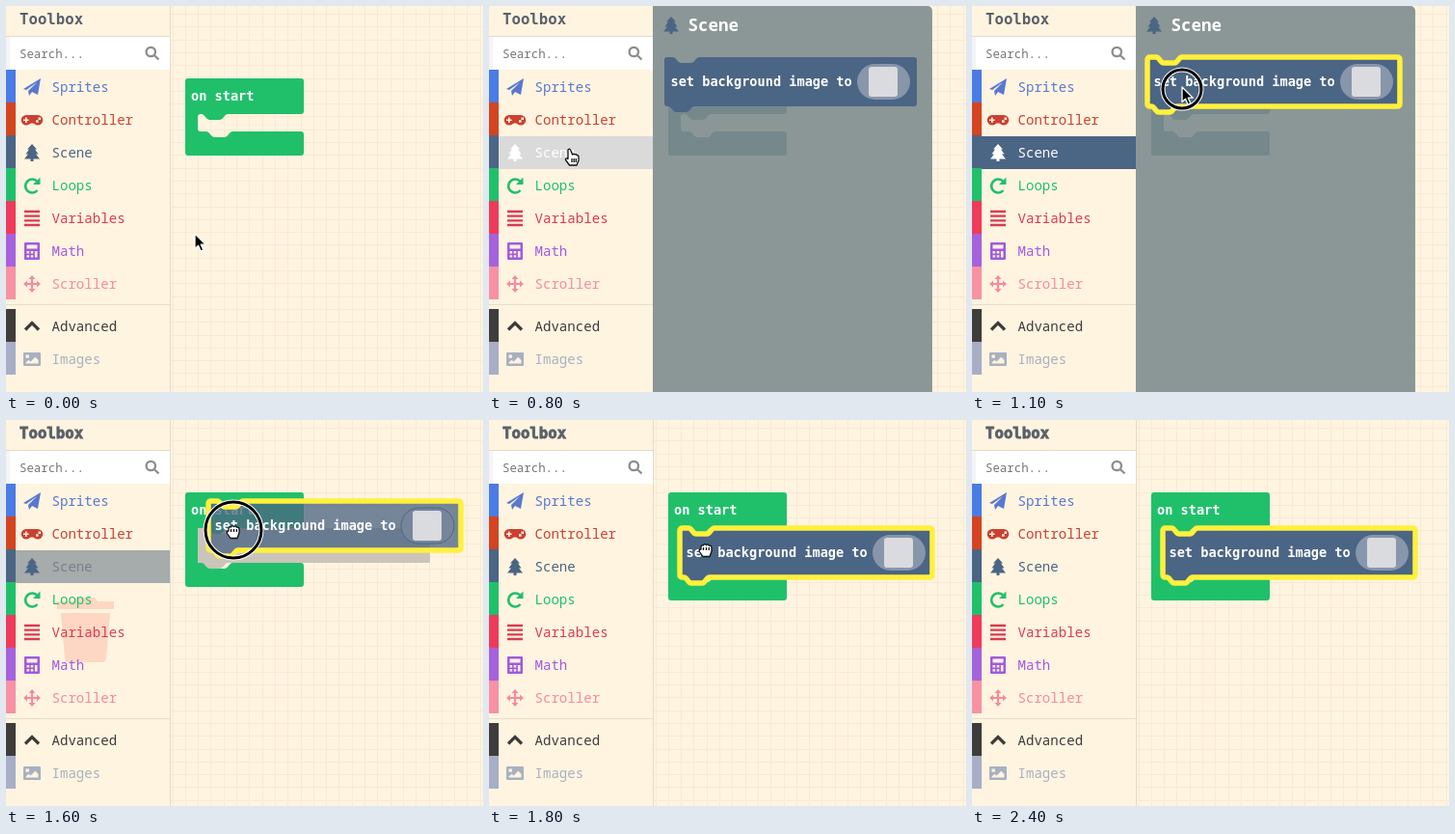
These frames come from a looping animation (495 px wide and 400 px high, 4.4 s). An HTML page with a canvas:

```html
<!DOCTYPE html>
<html lang="en">
<head>
<meta charset="utf-8">
<title>Block editor</title>
<style>
html, body { margin: 0; width: 100%; height: 100%; overflow: hidden; background: #fff4e0; }
canvas { display: block; }
</style>
</head>
<body>
<canvas id="stage" width="495" height="400"></canvas>
<script>
const ctx = document.getElementById('stage').getContext('2d');
const LOOP = 4400, TICK = 100;
const CREAM = '#fff4e0', SLATE = '#4b6584', GREEN = '#20c06b', YELLOW = '#fff03c';
const LIGHT_FONT = '"Noto Sans Mono", monospace';
const BLOCK_FONT = '"DejaVu Sans Mono", monospace';

// Each icon is [filled path, stroked path, line width], centred on 0,0.
const ICONS = {
  plane: ['M-9 2 9-9 6 8 0 5-3 9-4 4 5-5-6 3Z'],
  pad: ['M-6-5H6A5.3 5.3 0 0 1 6 5.6C3 5.6 3 3.5 0 3.5S-3 5.6-6 5.6A5.3 5.3 0 0 1-6-5Z' +
    'M-9-.6V1H-7V3H-5.4V1H-3.4V-.6H-5.4V-2.6H-7V-.6Z' +
    'M4 .2h2.6v2.6h-2.6ZM6.5-2.6h2.6v2.6h-2.6Z'],
  tree: ['M0-9 5-3.5H3L6.5 1.5H4L8 6.5H1.5V9H-1.5V6.5H-8L-4 1.5H-6.5L-3-3.5H-5Z'],
  redo: ['M8.5-8.5V-1H1Z', 'M5.5-4A7 7 0 1 0 5.5 5', 2.7],
  lines: ['', 'M-8-7H8M-8-2.3H8M-8 2.4H8M-8 7H8', 2.3],
  calc: ['M-7-9H7Q8-9 8-8V8Q8 9 7 9H-7Q-8 9-8 8V-8Q-8-9-7-9ZM-5.5-6.5V-2.5H5.5V-6.5Z' +
    'M-5.5 0v2.4h2.6V0ZM-1.3 0v2.4h2.6V0ZM2.9 0v6.6h2.6V0ZM-5.5 4.2v2.4h2.6V4.2ZM-1.3 4.2v2.4h2.6V4.2Z'],
  move: ['M0-9 3.6-5H-3.6ZM0 9 3.6 5H-3.6ZM-9 0-5-3.6V3.6ZM9 0 5-3.6V3.6Z', 'M-6 0H6M0-6V6', 2.2],
  up: ['', 'M-7 3.5 0-3.5 7 3.5', 3.2],
  image: ['M-8-7H8Q9-7 9-6V6Q9 7 8 7H-8Q-9 7-9 6V-6Q-9-7-8-7Z' +
    'M-6.5 4.5H6.5V1L3.3-2.2-1.5 2.5-3.5.8-6.5 3.4ZM-6.5-4.6h3.4v3.4h-3.4Z'],
};

const ROWS = [
  ['Sprites', 'plane', '#4b7be5', '#5978cf'],
  ['Controller', 'pad', '#d54420', '#cb4032'],
  ['Scene', 'tree', SLATE, SLATE],
  ['Loops', 'redo', GREEN, GREEN],
  ['Variables', 'lines', '#ee3b5b', '#d93c50'],
  ['Math', 'calc', '#a662dc', '#a05ae0'],
  ['Scroller', 'move', '#f791a3', '#f58b9f'],
  ['Advanced', 'up', '#3f3d3b', '#3c3c3c'],
  ['Images', 'image', '#a7aec6', '#a9b0bf'],
].map(([label, icon, strip, ink], i) => ({ label, icon, strip, ink, top: 67 + 34 * i + (i > 6 ? 10 : 0) - 1 }));
const SCENE = 2;

const CURSOR_KEYS = [[0, 196, 236], [300, 85, 149], [800, 85, 149], [1100, 218, 84], [1500, 218, 84],
  [1600, 236, 115], [1800, 225, 134], [2200, 225, 134], [2300, 205, 190]];
const BLOCK_KEYS = [[1500, 182, 53], [1600, 210, 84], [1800, 198, 112]];

function along(keys, t) {
  if (t <= keys[0][0]) return keys[0].slice(1);
  const i = keys.findIndex(k => k[0] >= t);
  if (i < 0) return keys[keys.length - 1].slice(1);
  const [t0, x0, y0] = keys[i - 1], [t1, x1, y1] = keys[i];
  const u = (t - t0) / (t1 - t0);
  return [x0 + (x1 - x0) * u, y0 + (y1 - y0) * u];
}

function rect(x, y, w, h, color, radius = 0) {
  ctx.fillStyle = color;
  ctx.beginPath();
  ctx.roundRect(x, y, w, h, radius);
  ctx.fill();
}

function text(str, x, y, font, color) {
  ctx.font = font;
  ctx.fillStyle = color;
  ctx.fillText(str, x, y);
}

function at(x, y, draw) {
  ctx.save();
  ctx.translate(x, y);
  draw();
  ctx.restore();
}

function shape(d, fill, stroke, width) {
  const path = new Path2D(d);
  if (fill) { ctx.fillStyle = fill; ctx.fill(path, 'evenodd'); }
  if (stroke) { ctx.strokeStyle = stroke; ctx.lineWidth = width; ctx.stroke(path); }
}

function icon(name, x, y, color) {
  const [solid, line, width] = ICONS[name];
  at(x, y, () => {
    shape(solid, color);
    if (line) shape(line, null, color, width);
  });
}

// Connector bump, starting 8px right of a block's left edge.
const BUMP = 'h5q2 0 4 3t4 3h11q2 0 4-3t4-3';
const BUMP_BACK = 'h-5q-2 0-4 3t-4 3h-11q-2 0-4-3t-4-3';

function startBlock(innerBottom, color) {
  shape(`M189 75H306q3 0 3 3V109q0 3-3 3H239h-4${BUMP_BACK}H202q-3 0-3 3V${innerBottom - 3}q0 3 3 3
    H203${BUMP}H306q3 0 3 3V${innerBottom + 22}q0 3-3 3H189q-3 0-3-3V78q0-3 3-3Z`, color);
}

function sceneBlock(x, y, glowing, dragged) {
  at(x, y, () => {
    const outline = `M3 0H4${BUMP}H259q3 0 3 3V48q0 3-3 3H36${BUMP_BACK}H3q-3 0-3-3V3q0-3 3-3Z`;
    ctx.globalAlpha = dragged ? .76 : 1;
    shape(outline, SLATE);
    ctx.globalAlpha = 1;
    if (glowing) shape(outline, null, YELLOW, 5.5);
    text('set background image to', 6.5, 30, `bold 13.6px ${BLOCK_FONT}`, '#fff');
    rect(200, 7, 55, 37, dragged ? '#75869b' : '#8896ab', 18.5);
    if (dragged) {
      ctx.strokeStyle = SLATE;
      ctx.lineWidth = 1;
      ctx.stroke();
    }
    rect(212, 10, 30, 31, '#d9dbde', 3);
  });
}

function trash(alpha) {
  ctx.globalAlpha = alpha;
  shape('M53 188H70L73 184H92L95 188H112V196H53ZM57 200H108L104 247Q104 251 100 251H65Q61 251 61 247Z', '#f8a28e');
  ctx.globalAlpha = 1;
}

function workspace() {
  rect(0, 0, 495, 400, CREAM);
  for (let x = 172.5; x < 495; x += 13.3) rect(Math.round(x), 0, 1, 400, '#f8ead5');
  for (let y = 8; y < 400; y += 13.3) rect(171, Math.round(y), 324, 1, '#f8ead5');
}

function toolbox(t, hover, selected) {
  rect(0, 0, 170, 400, CREAM);
  rect(170, 0, 1, 400, '#e3dacb');
  const title = `bold 15.7px ${BLOCK_FONT}`;
  text('Toolbox', 14, 19, title, '#5a6069');
  if (t >= 1600) {
    ctx.strokeStyle = '#5a6069';
    ctx.lineWidth = .8;
    ctx.strokeText('Toolbox', 14, 19);
  }
  rect(0, 31, 170, 1, '#e1dacd');
  rect(0, 32, 170, 34, '#fff');
  rect(0, 32, 4, 34, '#f4f4f6');
  text('Search...', 14, 54, `12.4px ${LIGHT_FONT}`, '#777');
  shape('M155 47.5a4.7 4.7 0 1 0-9.4 0a4.7 4.7 0 1 0 9.4 0M153.7 51 158.5 55.5', null, '#8d8d8d', 2.3);
  rect(0, 309, 170, 1, '#e7decf');

  const fading = t === 1600;
  if (fading || t === 1700) trash(fading ? .35 : .2);
  ROWS.forEach((row, i) => {
    const isScene = i === SCENE;
    const active = isScene && selected;
    let ink = active ? '#fff' : row.ink;
    if (active) rect(0, row.top + 1, 170, 34, hover === i ? '#dadada' : SLATE);
    else if (isScene && fading) rect(0, row.top + 1, 170, 34, '#a6abab');
    else if (hover === i) rect(10, row.top + 1, 160, 34, '#e7e5e3');
    rect(0, row.top, 10, 34, row.strip);
    icon(row.icon, 27, row.top + 18, ink);
    if (isScene && fading) ink = '#74808d';
    text(row.label, 47.5, row.top + 23, `500 14.1px ${LIGHT_FONT}`, ink);
  });
}

function flyout() {
  rect(170, 0, 290, 400, '#8b9796', [0, 5, 0, 0]);
  startBlock(130, '#75898c');
  icon('tree', 189, 20, SLATE);
  text('Scene', 206.5, 26, `bold 17.5px ${LIGHT_FONT}`, '#fff');
}

function ring(x, y, r) {
  for (const [color, width] of [['#fff', 5], ['#000', 3]]) {
    ctx.strokeStyle = color;
    ctx.lineWidth = width;
    ctx.beginPath();
    ctx.arc(x, y, r, 0, 7);
    ctx.stroke();
  }
}

const ARROW = 'M0 0V15.5L3.6 12.2 6 18 8.8 16.8 6.3 11.2H11.3Z';
const POINTER = 'M-3 0Q-1-2 0 1L1.5 5Q3 3.5 4 5Q5.5 4 6.2 5.8Q8 5.3 8 7.5V11L6 16H-1.5L-5.5 10.5Q-6 8-3 9.5Z';
const FIST = 'M-5-2Q-5-5-2.5-4Q-1.5-6.5.5-4.5Q2-6 3.3-3.8Q6-4.5 6 -1.5V2L4 7.5H-3L-6.5 2.5Q-7.5 0-5 0Z';

function cursor(t, x, y) {
  const dragging = t >= 1600 && t < 2300;
  at(x, y, () => {
    ctx.lineJoin = 'round';
    if (dragging) shape(FIST + 'M-2.5-2V1M.5-2V1M3.3-2V1', '#fff', '#111', 1.3);
    else if (x < 170) shape(POINTER + 'M1 9V13M3.2 9V13M5.3 9V13', '#fff', '#111', 1.3);
    else shape(ARROW, '#000', '#fff', 1.3);
  });
}

function render(t) {
  const [x, y] = along(CURSOR_KEYS, t);
  const open = t >= 800 && t < 1600;
  const hover = t < 1100 && x < 170 ? Math.floor((y - 67) / 34) : -1;
  const dragged = t === 1600 || t === 1700;

  workspace();
  toolbox(t, hover, open);
  if (open) {
    flyout();
  } else {
    startBlock(t < 1600 ? 130 : dragged ? 148 : 162, GREEN);
    text('on start', 192, 98, `bold 13.6px ${BLOCK_FONT}`, '#fff');
    if (dragged) shape(`M199 112H203${BUMP}H440V148H235${BUMP_BACK}H199Z`, '#cbc4ba');
  }
  if (t >= 800) sceneBlock(...along(BLOCK_KEYS, t), t >= 1100, dragged);

  if (t >= 300 && t < 800) ring(83, 148, 29);
  if (t >= 1100 && t < 1600) ring(218, 86, 20);
  if (t === 1600) ring(236, 114, 29);
  if (t < 2400) cursor(t, x, y);
}

const begun = performance.now();
function frame() {
  const elapsed = (performance.now() - begun) % LOOP;
  render(Math.floor(elapsed / TICK) * TICK);
  requestAnimationFrame(frame);
}
frame();
</script>
</body>
</html>
```
